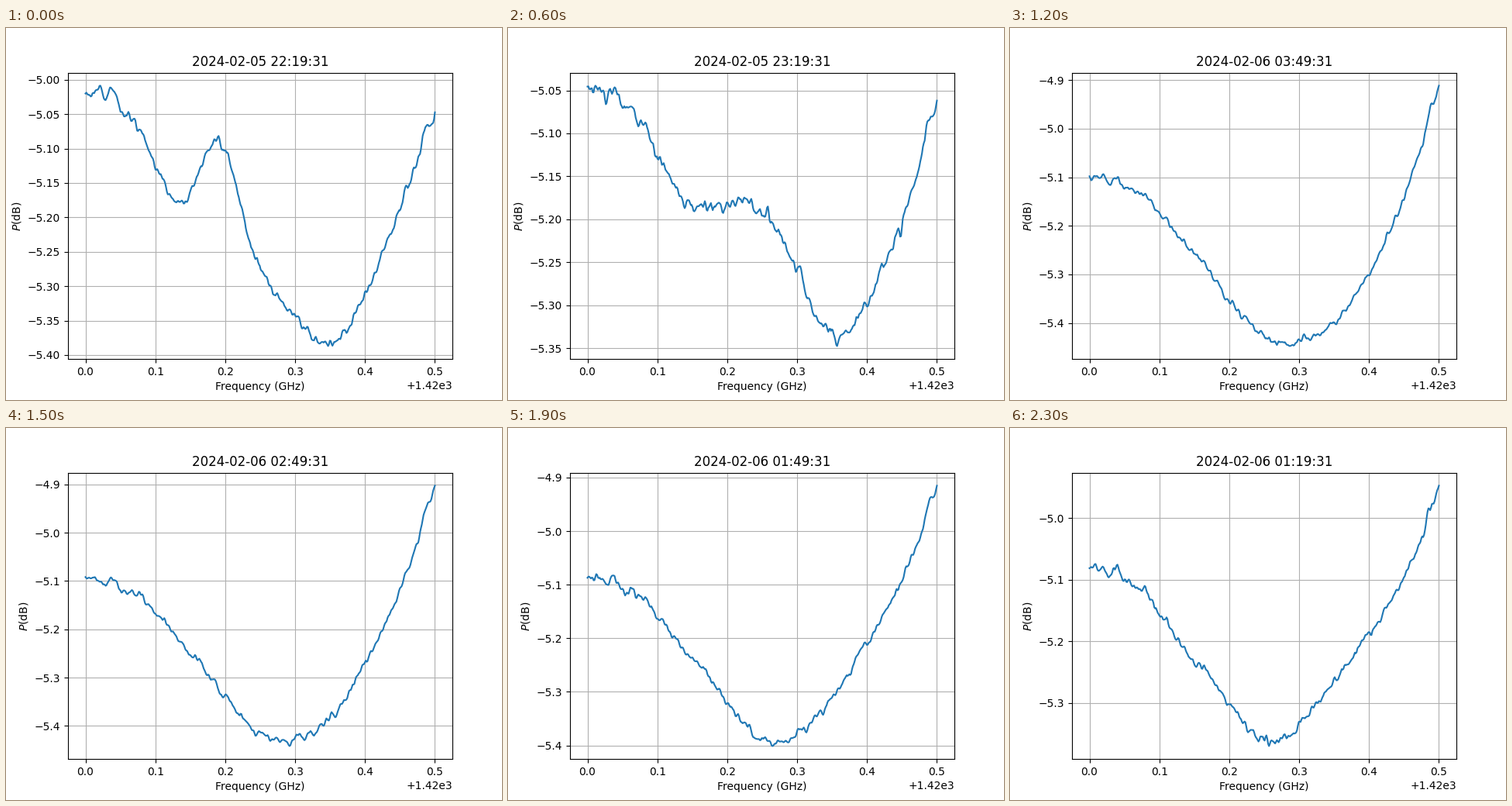
A matplotlib script that plays this animation: 640 by 480 pixels, repeating every 2.4 s.

```python
import matplotlib.pyplot as plt
import numpy as np
from matplotlib.animation import FuncAnimation

F0 = 1420.0
SPAN = 0.5
offset = np.linspace(0, SPAN, 400)

# Late-night passband: mdB below -5 dB at even steps along the band
PASSBAND = [89, 110, 170, 248, 351, 426, 420, 361, 258, 88, -122]
SPIKES = [0.037, 0.08, 0.168, 0.304, 0.487]

# Sweeps arrive out of time order; each slot is half an hour
ORDER = [0, 12, 8, 5, 15, 2, 18, 13, 4, 20, 16, 11,
         14, 21, 9, 17, 3, 10, 7, 1, 19, 22, 6]


def bell(center, width):
    return np.exp(-0.5 * ((offset - center) / width) ** 2)


def noise(seed, sd, width):
    """Seeded noise smoothed over `width` samples, scaled to `sd`."""
    t = np.arange(-3 * width, 3 * width + 1)
    kernel = np.exp(-0.5 * (t / width) ** 2)
    raw = np.random.default_rng(seed).normal(size=offset.size + t.size - 1)
    return sd * np.convolve(raw, kernel / np.sqrt(np.sum(kernel**2)), "valid")


knots = np.linspace(0, SPAN, len(PASSBAND))
passband = np.polyval(np.polyfit(knots, PASSBAND, 6), offset)
passband -= 12 * sum(bell(s, 0.004) for s in SPIKES)
passband += noise(1, 4, 3)  # ripple common to every sweep


def fall(s, mid, width):
    """Ease from 1 to 0 around slot `mid`."""
    return (1 - np.tanh((s - mid) / width)) / 2


def spectrum(s):
    x = offset / SPAN
    lift = 93 * np.exp(-s / 5.5) - 21
    tilt = 250 * fall(s, 5.3, 2.8) * x**4
    wave = (65 * np.exp(-s / 1.5) * np.sin(np.pi * x)
            * np.cos(2 * np.pi * (offset - 0.12) / 0.27))
    # Emission line drifting up the band, and a weaker fixed one
    center = 0.192 + 0.3 * (1 - np.exp(-s / 7.8))
    width = 0.028 + 0.047 * (1 - np.exp(-s / 2))
    line = (220 * fall(s, 7, 2.2) - 45) * bell(center, width)
    fixed = 18 * s**2 * np.exp(-s / 2) * bell(0.2, 0.03)
    drop = passband - lift + tilt + wave - line - fixed
    return -5 - (drop + noise(100 + s, 3.5, 1)) / 1000


def timestamp(slot):
    minutes = 22 * 60 + 19 + 30 * slot
    day, minutes = divmod(minutes, 24 * 60)
    return f"2024-02-{5 + day:02d} {minutes // 60:02d}:{minutes % 60:02d}:31"


fig, ax = plt.subplots(figsize=(6.4, 4.8), dpi=100)
curve, = ax.plot(F0 + offset, spectrum(0))
ax.set_xlabel("Frequency (GHz)")
ax.set_ylabel("$P$(dB)")
ax.grid()


def update(i):
    slot = ORDER[max(i - 1, 0)]  # the first sweep is held twice as long
    curve.set_ydata(spectrum(slot))
    ax.set_title(timestamp(slot))
    ax.relim()
    ax.autoscale_view()
    return curve,


anim = FuncAnimation(fig, update, frames=len(ORDER) + 1, interval=100,
                     repeat=True, repeat_delay=0)
plt.show()
```
